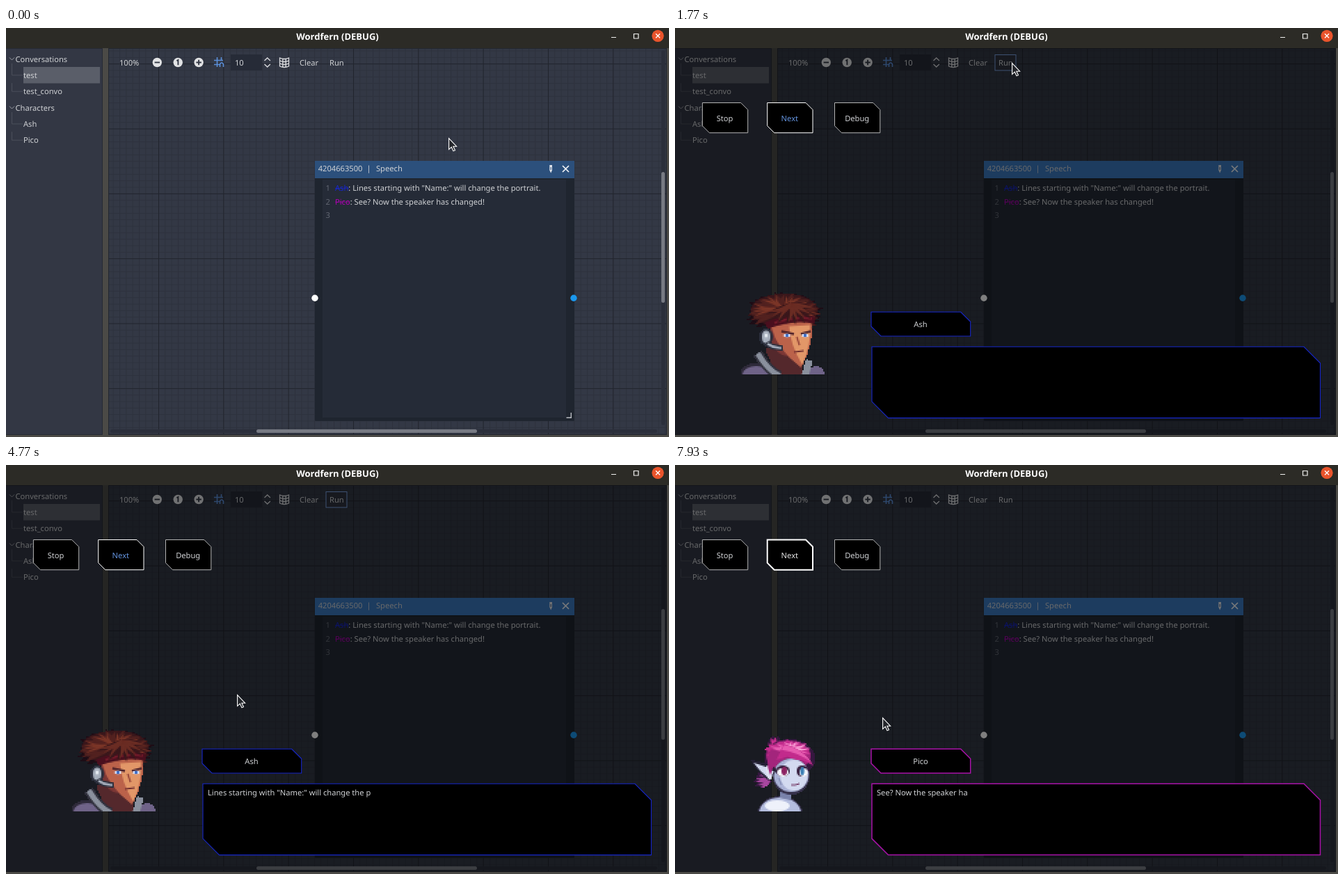
An HTML page with a canvas for the animation above (8 s loop, 953x588 px).

```html
<!DOCTYPE html>
<html lang="en">
<head>
<meta charset="utf-8">
<title>Dialogue editor</title>
<style>
html, body { margin: 0; width: 100%; height: 100%; overflow: hidden; background: #2c2b26; }
svg { display: block; width: 100vw; height: 100vh; }
text { font: 11.15px "Noto Sans", "Open Sans", sans-serif; fill: #cfd1d4; white-space: pre; text-rendering: geometricPrecision; }
.title { font-size: 13px; font-weight: 700; fill: #fff; text-anchor: middle; }
.mid { text-anchor: middle; }
.num { fill: #626772; }
.line { fill: none; stroke: #4b4f5a; }
.icon { fill: none; stroke: #dcdde0; stroke-width: 1.3; }
.track { fill: #2b2f3b; }
.thumb { fill: #777a83; }
canvas { display: block; width: 120px; height: 120px; image-rendering: pixelated; }
</style>
</head>
<body>
<svg viewBox="0 0 953 588">
  <defs>
    <pattern id="minor" x="219" y="51.2" width="9.333" height="9.333" patternUnits="userSpaceOnUse">
      <path d="M.5 0V9.34M0 .5H9.34" stroke="#000" stroke-opacity=".12"/>
    </pattern>
    <pattern id="major" x="219" y="51.2" width="93.33" height="93.33" patternUnits="userSpaceOnUse">
      <path d="M.5 0V93.4M0 .5H93.4" stroke="#000" stroke-opacity=".27"/>
    </pattern>
  </defs>

  <!-- window frame -->
  <rect width="953" height="588" fill="#4b4a46"/>
  <rect width="953" height="29" fill="#2c2b26"/>
  <text class="title" x="476.5" y="17">Wordfern (DEBUG)</text>
  <path d="M870 13.5H877M902.5 8.5H909V15H902.5Z" fill="none" stroke="#f0f0ee" stroke-width="1.2"/>
  <circle cx="937" cy="11.3" r="8.6" fill="#e9542c"/>
  <path d="M934 8.3l6 6m0-6l-6 6" stroke="#fff" stroke-width="1.3"/>

  <!-- sidebar -->
  <rect y="29" width="139" height="556" fill="#333744"/>
  <path d="M0 29.5H138.5V584.5H0" fill="none" stroke="#262a34"/>
  <rect x="25" y="56" width="110" height="23.5" fill="#5a5e69"/>
  <g id="tree"></g>

  <!-- graph -->
  <g id="graph"></g>
  <rect x="147.5" y="29.5" width="802" height="555" fill="none" stroke="#232730"/>
  <rect class="track" x="942" y="32" width="5" height="539" rx="2.5"/>
  <rect class="thumb" x="942" y="207" width="5" height="188" rx="2.5"/>
  <rect class="track" x="150" y="577" width="786" height="5" rx="2.5"/>
  <rect class="thumb" x="360" y="577" width="317" height="5" rx="2.5"/>

  <!-- toolbar -->
  <text x="163" y="54">100%</text>
  <g id="zoom"></g>
  <path d="M303.5 42v14M299 46.500h13M299 52.500h8M309.500 42v5M307.500 56v-4q2.500-4 5 0v4" fill="none" stroke="#5b8fd9" stroke-width="1.6"/>
  <rect x="323" y="38" width="45" height="23" fill="#262b37"/>
  <text x="329" y="54">10</text>
  <path class="icon" d="M371.5 47l4.200-4l4.200 4m-8.400 5l4.200 4l4.200-4"/>
  <path class="icon" d="M393.500 43q6.500 3 13 0v12q-6.500 3-13 0zm0 4q6.500 3 13 0m-13 4q6.500 3 13 0M397.800 44v12M402.200 44v12"/>
  <text x="422" y="54">Clear</text>
  <rect id="runBox" x="460" y="38.5" width="30" height="22.5" fill="#2c313d" fill-opacity=".6" stroke="#7aa4e6"/>
  <text id="run" x="465" y="54">Run</text>

  <!-- speech node -->
  <rect x="444" y="191" width="373" height="374" rx="1" fill="#1f252f"/>
  <rect id="bar" x="444" y="191" width="373" height="25"/>
  <rect x="455" y="218" width="350" height="342" fill="#252b37"/>
  <text x="448.7" y="206">4204663500</text>
  <text x="518.5" y="206">|</text>
  <text x="532" y="206">Speech</text>
  <path d="M781.300 197h3.700v7.500l-1.800 4l-1.900-4z" fill="#dfe3ea"/>
  <path d="M783.200 200v4" stroke="#2c507c"/>
  <path d="M800 198l9 9m0-9l-9 9" stroke="#f0f2f5" stroke-width="1.7"/>
  <g id="script"></g>
  <circle cx="444" cy="388.2" r="4.7" fill="#fff"/>
  <circle cx="816" cy="388.2" r="4.7" fill="#1a98ee"/>
  <path d="M805.500 560.300h6.800v-7.300" fill="none" stroke="#b9bcc2" stroke-width="1.4"/>

  <!-- dialogue preview -->
  <g id="play">
    <rect y="29" width="950" height="556" fill="#000" fill-opacity=".5"/>
    <g id="buttons"></g>
    <foreignObject x="95" y="378" width="120" height="120">
      <canvas xmlns="http://www.w3.org/1999/xhtml" id="ash" width="60" height="60"></canvas>
      <canvas xmlns="http://www.w3.org/1999/xhtml" id="pico" width="60" height="60"></canvas>
    </foreignObject>
    <path id="nameBox" fill="#000"/>
    <path id="talkBox" fill="#000"/>
    <text id="name" class="mid" x="353" y="429.5"></text>
    <text id="talk" x="290" y="475" fill="#e4e4e4"></text>
  </g>
  <path id="cursor" d="M0 0v16l3.700-3.400l2.700 5.700l2.500-1.100l-2.600-5.600h4.700z" fill="#24262b" stroke="#fff" stroke-width="1.1"/>
</svg>
<script>
const LOOP = 8000;
const SELECT = 530, PRESS_RUN = 1620, PLAY = 1765, PRESS_NEXT = 6190, SWITCH = 6365;
const $ = id => document.getElementById(id);
const set = (el, attrs) => { for (const k in attrs) el.setAttribute(k, attrs[k]); return el; };
const add = (parent, tag, attrs, text = '') => {
  const el = set(document.createElementNS('http://www.w3.org/2000/svg', tag), attrs);
  el.textContent = text;
  return $(parent).appendChild(el);
};

const speakers = {
  ash: { name: 'Ash', color: '#1626c8', ink: '#1626d8', width: 1.1, from: 1847, step: 66.2,
    line: 'Lines starting with "Name:" will change the portrait.' },
  pico: { name: 'Pico', color: '#a812a8', ink: '#b000b4', width: 1.5, from: 6464, step: 66.6,
    line: 'See? Now the speaker has changed!' }
};

// Sidebar rows; a leading dash marks a child
['Conversations', '-test', '-test_convo', 'Characters', '-Ash', '-Pico'].forEach((row, i) => {
  const y = 44.5 + 23.35 * i, child = row[0] === '-';
  add('tree', 'path', child
    ? { class: 'line', d: `M8.500 ${y - 22 + i % 3 * 5}V${y}H24` }
    : { d: `M5 ${y - 2}l3.500 3.500l3.500-3.500`, fill: 'none', stroke: '#9b9ea6' });
  add('tree', 'text', { x: child ? 25 : 13.5, y: y + 4 }, row.replace('-', ''));
});

for (const fill of ['#333845', 'url(#minor)', 'url(#major)'])
  add('graph', 'rect', { x: 147, y: 29, width: 803, height: 556, fill });

['m-3.700 0h7.400', 'm-1.800-2.200l2-1.300v7.200', 'm-3.700 0h7.400m-3.700-3.700v7.400'].forEach((sign, i) => {
  const cx = 217.3 + 29.9 * i;
  add('zoom', 'circle', { cx, cy: 49.5, r: 6.7, fill: '#e2e3e5' });
  add('zoom', 'path', { d: `M${cx} 49.500${sign}`, fill: 'none', stroke: '#333845', 'stroke-width': 1.9 });
});

[speakers.ash, speakers.pico, null].forEach((s, i) => {
  const y = 234 + 19.7 * i;
  add('script', 'text', { class: 'num', x: 459.5, y }, i + 1);
  if (!s) return;
  const text = add('script', 'text', { x: 473, y });
  text.innerHTML = `<tspan fill="${s.ink}">${s.name}</tspan>: ${s.line}`;
  add('script', 'path', { d: `M473 ${y - 3.5}h20`, stroke: s.ink, 'stroke-opacity': .6 });
});

// Box with the top right and bottom left corners cut off
const cutBox = (x, y, w, h, c) =>
  `M${x} ${y}h${w - c}l${c} ${c}v${h - c}h${c - w}l${-c} ${-c}Z`;

const [, next] = ['Stop', 'Next', 'Debug'].map((label, i) => {
  const x = 39.4 + 93.3 * i + (i > 1 ? 3.5 : 0), w = 65.3;
  return {
    box: add('buttons', 'path', { d: cutBox(x, 107.5, w, 43.2, 10), fill: '#000', stroke: '#b4b4b4' }),
    text: add('buttons', 'text', { class: 'mid', x: x + w / 2 - .5, y: 133.5 }, label)
  };
});
set($('nameBox'), { d: cutBox(282, 408.3, 142.7, 34.7, 14) });
set($('talkBox'), { d: cutBox(283, 458.3, 644.5, 102.3, 23.5) });

// Portraits are sketched on a 60 x 60 grid and shown as hard pixels
function portrait(id, seed, sketch) {
  const c = $(id).getContext('2d', { willReadFrequently: true });
  const random = () => (seed = seed * 16807 % 2147483647) / 2147483647;
  const pen = {
    oval(color, x, y, rx, ry, turn = 0) {
      c.fillStyle = color;
      c.beginPath();
      c.ellipse(x, y, rx, ry, turn, 0, 7);
      c.fill();
    },
    stroke(color, w, x0, y0, x1, y1, sag = 0) {
      c.strokeStyle = color;
      c.lineWidth = w;
      c.beginPath();
      c.moveTo(x0, y0);
      c.quadraticCurveTo((x0 + x1) / 2, (y0 + y1) / 2 + sag, x1, y1);
      c.stroke();
    },
    // Tapered strand from a wide root to a pointed tip
    lock(color, w, x0, y0, x1, y1, bend = 0) {
      const len = Math.hypot(x1 - x0, y1 - y0);
      const nx = (y0 - y1) / len, ny = (x1 - x0) / len;
      const mx = (x0 + x1) / 2 + nx * bend, my = (y0 + y1) / 2 + ny * bend;
      const h = w / 2;
      c.fillStyle = color;
      c.beginPath();
      c.moveTo(x0 + nx * h, y0 + ny * h);
      c.quadraticCurveTo(mx + nx * h, my + ny * h, x1, y1);
      c.quadraticCurveTo(mx - nx * h, my - ny * h, x0 - nx * h, y0 - ny * h);
      c.fill();
    },
    // Strands spread from a crown to an elliptic outline
    fan(color, w, n, x, y, rx, ry, from, to, bend = 3) {
      for (let i = 0; i < n; i++) {
        const a = from + (to - from) * i / (n - 1), r = .88 + .14 * random();
        pen.lock(color, w, x, y - ry * .2, x + rx * r * Math.cos(a), y + ry * r * Math.sin(a), bend * (2 * random() - 1));
      }
    }
  };
  sketch(pen);
  const image = c.getImageData(0, 0, 60, 60);
  for (let i = 3; i < image.data.length; i += 4) image.data[i] = image.data[i] > 110 ? 255 : 0;
  c.putImageData(image, 0, 0);
}

portrait('ash', 71, ({ oval, stroke, lock, fan }) => {
  fan('#1d0d16', 10, 24, 31, 17, 29, 17, 2.5, 7);
  oval('#3a171b', 31, 14, 24, 12);
  fan('#52211f', 6, 17, 31, 17, 27, 16, 2.6, 6.8);
  fan('#7a3527', 2.5, 15, 31, 16, 26, 14, 2.9, 6.6, 5);
  // jacket and neck
  oval('#2e2a3a', 11, 60, 12, 8);
  oval('#6f6388', 11, 60, 10, 6);
  oval('#6f6388', 54, 60, 6, 6);
  lock('#54282c', 26, 30, 38, 40, 72);
  stroke('#30303c', 7, 12, 45, 28, 61, 5);
  stroke('#8a909d', 4, 12, 45, 28, 61, 5);
  stroke('#8a909d', 5, 49, 50, 46, 61);
  // face
  oval('#7c3735', 30, 33, 9, 14, -.3);
  lock('#bb624a', 29, 36, 23, 43, 55);
  lock('#e29768', 15, 42, 25, 44, 53);
  stroke('#4a1f28', 1.6, 29, 29, 38, 31);
  stroke('#4a1f28', 1.6, 43, 31, 50, 29);
  for (const x of [33, 46]) {
    oval('#dfe8ff', x, 32, 2.6, 1.2);
    oval('#3f70c8', x, 32, 1.2, 1.2);
  }
  stroke('#97473b', 1.2, 40, 33, 42, 39);
  stroke('#6b2a2e', 1.2, 38, 44, 45, 43);
  // headband and fringe
  stroke('#4a0f1e', 5, 18, 25, 53, 21, -5);
  stroke('#741a2a', 1.5, 24, 23, 51, 20, -4);
  fan('#3a171b', 5, 9, 36, 13, 20, 12, 0, 2.8);
  fan('#6a2c23', 3, 8, 36, 12, 18, 11, .1, 2.9);
  // headset
  oval('#2b2e3c', 18, 33, 5, 6);
  oval('#a8b0be', 18, 33, 3, 4.5);
  oval('#e3e8ef', 18, 32, 1.2, 1.6);
  stroke('#2b2e3c', 4, 18, 38, 30, 41, 2);
  stroke('#a8b0be', 1.6, 19, 38, 29, 41, 2);
});

portrait('pico', 29, ({ oval, stroke, lock, fan }) => {
  // ponytail, tuft and back hair
  fan('#35183f', 6, 5, 20, 38, 12, 8, 2.2, 4);
  fan('#a8479f', 3, 5, 20, 38, 10, 7, 2.3, 3.8);
  fan('#35183f', 6, 5, 24, 13, 6, 8, 3.2, 5.8);
  fan('#c9308f', 3, 4, 24, 13, 5, 7, 3.4, 5.6);
  oval('#35183f', 35, 22, 18, 14);
  oval('#a3257c', 34, 20, 16, 11);
  // shoulders
  oval('#35304a', 28, 61, 16, 12);
  oval('#b4bdde', 28, 61, 15, 11);
  oval('#eef1fa', 26, 56, 9, 4);
  stroke('#7982aa', 4, 28, 48, 36, 50);
  // face and ear
  oval('#35304a', 36, 35, 13, 13);
  oval('#aab2d6', 36, 34, 12.5, 12);
  oval('#d3daf0', 38, 34, 10, 11);
  lock('#232034', 10, 23, 34, 7, 23);
  lock('#d3daf0', 6, 22, 34, 9, 25);
  oval('#dfe4f2', 20, 32, 2, 5, -.2);
  // eyes and mouth
  oval('#38213f', 30, 31, 5, 4);
  oval('#38213f', 44, 31, 4, 4);
  oval('#f7f9ff', 30, 32, 4, 3);
  oval('#f7f9ff', 45, 32, 3, 3);
  oval('#8c2262', 31, 31, 2, 3);
  oval('#3d80b5', 44, 31, 1.5, 3);
  stroke('#8790b8', 1, 27, 36, 29, 41);
  stroke('#7b4570', 1, 36, 41, 42, 40, 1);
  // fringe
  fan('#c22b8c', 8, 11, 34, 18, 18, 10, 2.5, 6.8);
  fan('#e65bb0', 3, 10, 35, 17, 16, 8, 3.2, 6.9);
  fan('#f6a3d6', 1.5, 6, 38, 16, 12, 6, 3.4, 6);
  lock('#c22b8c', 8, 29, 15, 52, 27, -4);
  lock('#e65bb0', 4, 30, 14, 51, 25, -4);
  lock('#a3257c', 7, 25, 16, 21, 34, 3);
});

// Pointer moves: start time, end time, x, y
const moves = [
  [100, 670, 774, 197], [1080, 1610, 484, 50], [1850, 2510, 614, 190], [4030, 4640, 332, 330],
  [4950, 5290, 296, 310], [5480, 5640, 249, 244], [5720, 5825, 190, 166], [5940, 6120, 168, 128],
  [6420, 6780, 300, 363], [7080, 7180, 298, 363]
];

function pointer(t) {
  let x = 636, y = 158;
  for (const [t0, t1, toX, toY] of moves) {
    const u = Math.min(1, Math.max(0, (t - t0) / (t1 - t0))), e = u * u * (3 - 2 * u);
    x += (toX - x) * e;
    y += (toY - y) * e;
  }
  return `translate(${x + .6} ${y + .6})`;
}

function draw(t) {
  const focus = t >= PRESS_RUN && t < PRESS_NEXT;
  const who = t < SWITCH ? 'ash' : 'pico';
  const { name, color, width, line, from, step } = speakers[who];

  set($('bar'), { fill: t < SELECT ? '#2c507c' : '#3a79c0' });
  $('runBox').style.display = focus ? '' : 'none';
  $('run').style.fill = focus && t < PLAY ? '#6b9be0' : '';

  $('play').style.display = t < PLAY ? 'none' : '';
  for (const id in speakers) $(id).style.display = id === who ? '' : 'none';
  for (const id of ['nameBox', 'talkBox']) set($(id), { stroke: color, 'stroke-width': width });
  $('name').textContent = name;
  $('talk').textContent = line.slice(0, Math.max(0, 1 + Math.floor((t - from) / step)));
  set(next.box, { stroke: '#fff', 'stroke-width': t < PRESS_NEXT ? 1 : 2 });
  next.text.style.fill = t < SWITCH ? '#6393de' : '#e4e4e4';

  set($('cursor'), { transform: pointer(t) });
}

const start = performance.now();
(function tick() {
  draw((performance.now() - start) % LOOP);
  requestAnimationFrame(tick);
})();
</script>
</body>
</html>
```
